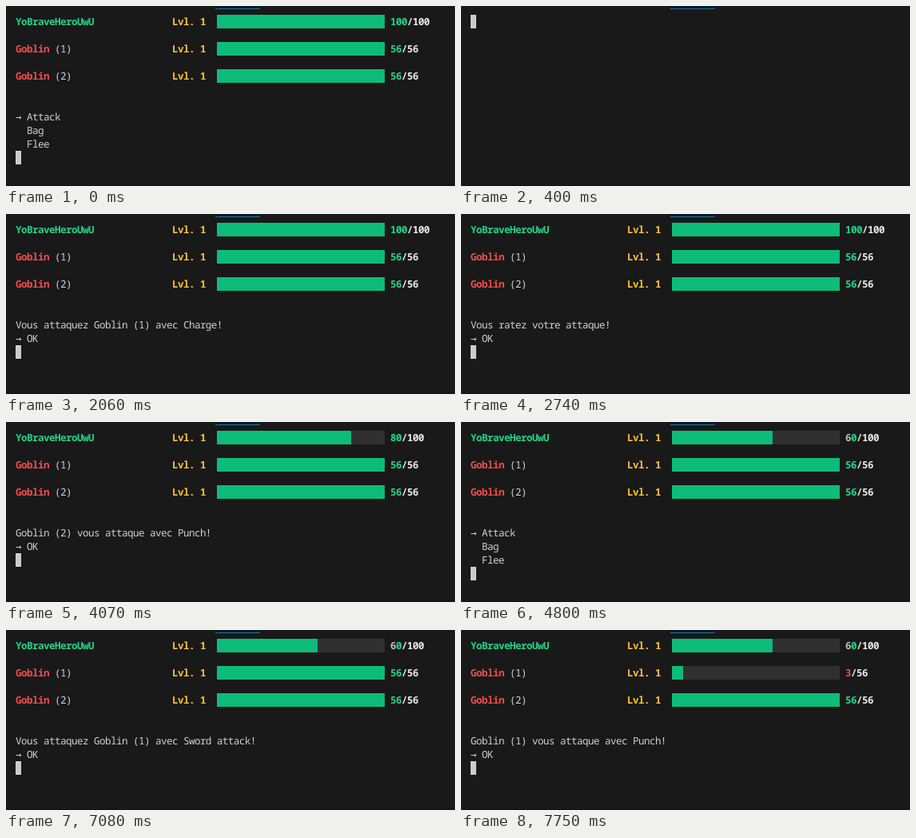
Recreate the animation shown at these times as an HTML page. Size 562x225 px, loop 8000 ms.

```html
<!DOCTYPE html>
<html lang="fr">
<head>
<meta charset="utf-8">
<title>Terminal battle</title>
<style>
  html, body { margin: 0; width: 100%; height: 100%; overflow: hidden; background: #191919; }
  svg { display: block; }
  text {
    font: 500 12.6px "Noto Sans Mono", "DejaVu Sans Mono", monospace;
    letter-spacing: -0.56px;
    fill: #d0d0d0;
    text-rendering: geometricPrecision;
  }
  .b { font-weight: 600; }
  .arrow { font: 12.6px "DejaVu Sans Mono", monospace; }
  .green { fill: #23d18b; }
  .red { fill: #f14c4c; }
  .low { fill: #dc5745; }
  .dim { fill: #bdbdae; }
  .gold { fill: #fcc22d; }
  .white { fill: #e5e5e5; }
</style>
</head>
<body>
<svg width="562" height="225" viewBox="0 0 562 225">
  <rect width="562" height="225" fill="#191919"/>
  <rect x="262" y="3" width="56" height="1" fill="#0c79b8"/>
  <rect y="224" width="562" height="1" fill="#121212"/>
  <g id="screen"></g>
</svg>
<script>
const CELL = 7, LINE = 17, LEFT = 12, TOP = 11;
const BAR_CELLS = 30, LOOP = 8000;

const x = col => LEFT + col * CELL;
const y = row => TOP + row * LINE;

const text = (col, row, str, cls = '') =>
  `<text x="${x(col)}" y="${y(row) + 13}" class="${cls}">${str}</text>`;

const block = (col, row, cells, fill) =>
  `<rect x="${x(col)}" y="${y(row)}" width="${cells * CELL}" height="${LINE}" fill="${fill}"/>`;

function health(row, hp, max) {
  const value = String(hp), low = hp / max < 0.25;
  const filled = Math.ceil(hp / max * BAR_CELLS);
  const digits = [...value].map((d, i) =>
    text(67 + i, row, d, 'b ' + (low ? 'low' : hp === 60 && i === 0 ? 'dim' : 'green')));
  return text(28, row, 'Lvl. 1', 'b gold') +
    block(36, row, BAR_CELLS, '#303030') + block(36, row, filled, '#0dbc79') +
    digits.join('') + text(67 + value.length, row, '/' + max, 'b white');
}

const goblin = (row, n, hp) =>
  text(0, row, 'Goblin', 'b red') + text(7, row, `(${n})`) + health(row, hp, 56);

// Menu entries sit below the fighters; an arrow marks the selected one.
const menu = (items, pick = 0, from = 7) =>
  items.map((item, i) =>
    (i === pick ? text(0, from + i, '→', 'arrow') : '') + text(2, from + i, item)).join('') +
  block(0, from + items.length, 1, '#ccc');

const say = line => text(0, 7, line) + menu(['OK'], 0, 8);

const battle = (hp, hp1, panel) =>
  text(0, 0, 'YoBraveHeroUwU', 'b green') + health(0, hp, 100) +
  goblin(2, 1, hp1) + goblin(4, 2, 56) + panel;

const cleared = block(0, 0, 1, '#ccc');
const actions = ['Attack', 'Bag', 'Flee'];
const attacks = ['Charge', 'Sword attack', 'Back'];
const targets = ['Goblin (1)', 'Goblin (2)', 'Back'];

const steps = [
  [0, battle(100, 56, menu(actions))],
  [400, cleared],
  [470, battle(100, 56, menu(actions))],
  [1330, battle(100, 56, menu(attacks))],
  [2060, battle(100, 56, say('Vous attaquez Goblin (1) avec Charge!'))],
  [2670, cleared],
  [2740, battle(100, 56, say('Vous ratez votre attaque!'))],
  [3410, battle(100, 56, say('Goblin (1) vous attaque avec Punch!'))],
  [4070, battle(80, 56, say('Goblin (2) vous attaque avec Punch!'))],
  [4740, battle(60, 56, menu(actions.slice(0, 2)))],
  [4800, battle(60, 56, menu(actions))],
  [5610, battle(60, 56, menu(attacks))],
  [6010, battle(60, 56, menu(attacks, 1))],
  [6480, battle(60, 56, menu(targets.slice(0, 2)))],
  [6550, battle(60, 56, menu(targets))],
  [7080, battle(60, 56, say('Vous attaquez Goblin (1) avec Sword attack!'))],
  [7750, battle(60, 3, say('Goblin (1) vous attaque avec Punch!'))],
];

const screenEl = document.getElementById('screen');
const start = performance.now();
let shown = -1;

function draw() {
  const t = (performance.now() - start) % LOOP;
  const now = steps.findLastIndex(([at]) => at <= t);
  if (now !== shown) {
    screenEl.innerHTML = steps[now][1];
    shown = now;
  }
  requestAnimationFrame(draw);
}
draw();
</script>
</body>
</html>
```
